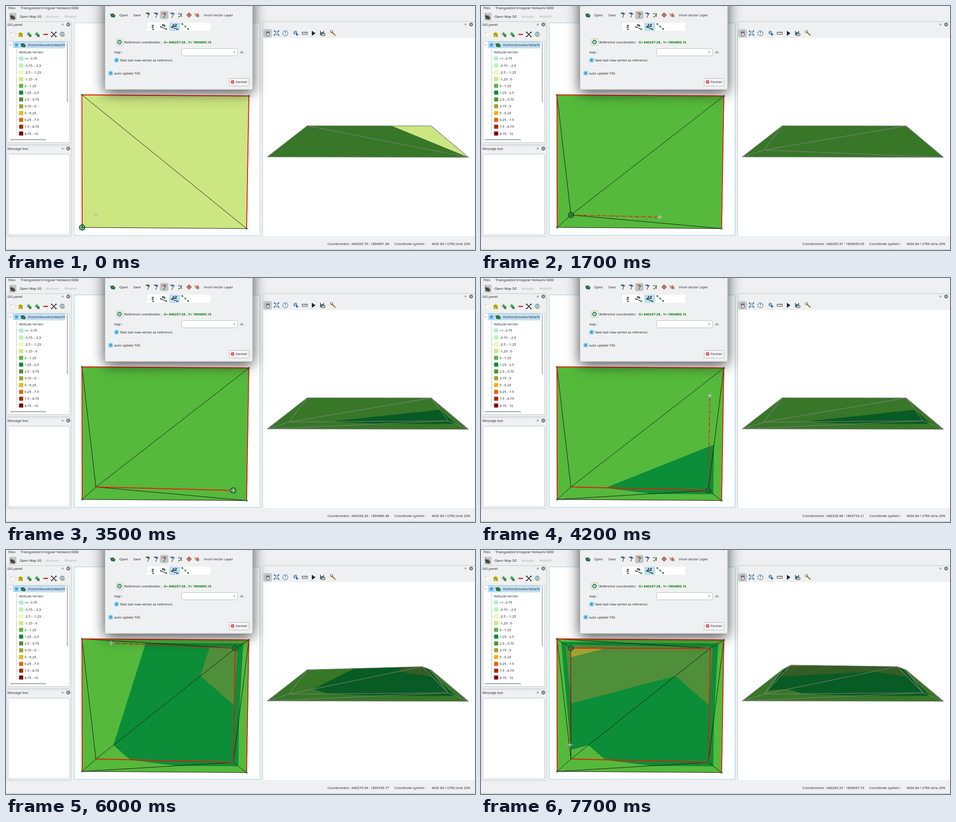
Write an HTML page with a canvas that moves like this. It is 1035 px wide and 541 px high and loops after 8 s.

```html
<!DOCTYPE html>
<html lang="en">
<head>
<meta charset="utf-8">
<title>TIN editor</title>
<style>
html, body { margin: 0; width: 100%; height: 100%; overflow: hidden; background: #eff0f1; }
canvas { display: block; width: 1035px; height: 541px; }
</style>
</head>
<body>
<canvas id="stage" width="1035" height="541"></canvas>
<script>
const g = document.getElementById('stage').getContext('2d');
const LOOP = 8000;
const INK = '#232629', BG = '#eff0f1', BLUE = '#3daee9', RED = '#f5140c', STEEL = '#3f78a8';

// ---------- drawing helpers ----------
function rect(x, y, w, h, fill, stroke, r = 0) {
  g.beginPath();
  g.roundRect(x, y, w, h, r);
  if (fill) { g.fillStyle = fill; g.fill(); }
  if (stroke) { g.strokeStyle = stroke; g.lineWidth = 1; g.stroke(); }
}
function trace(points) {
  g.beginPath();
  points.forEach(([x, y]) => g.lineTo(x, y));
}
function poly(points, fill) {
  trace(points);
  g.fillStyle = fill;
  g.fill();
}
function line(points, color = INK, width = 1, dash = []) {
  trace(points);
  g.setLineDash(dash);
  g.strokeStyle = color;
  g.lineWidth = width;
  g.stroke();
  g.setLineDash([]);
}
const seg = (x0, y0, x1, y1, ...style) => line([[x0, y0], [x1, y1]], ...style);
function disc(x, y, r, fill, stroke, width = 1, dash = []) {
  g.beginPath();
  g.arc(x, y, r, 0, 2 * Math.PI);
  if (fill) { g.fillStyle = fill; g.fill(); }
  if (!stroke) return;
  g.setLineDash(dash);
  g.strokeStyle = stroke;
  g.lineWidth = width;
  g.stroke();
  g.setLineDash([]);
}
function text(s, x, y, color = INK, weight = '', size = 7.5) {
  g.font = `${weight} ${size}px "Noto Sans", sans-serif`;
  g.fillStyle = color;
  g.fillText(s, x, y);
}
function cross(x, y, r, color, width) {
  seg(x - r, y - r, x + r, y + r, color, width);
  seg(x - r, y + r, x + r, y - r, color, width);
}
function plus(x, y, r, color, width) {
  seg(x - r, y, x + r, y, color, width);
  seg(x, y - r, x, y + r, color, width);
}
function diamond(x, y, r, color) {
  poly([[x, y - r], [x + r, y], [x, y + r], [x - r, y]], color);
}
function checkbox(x, y) {
  rect(x - 4, y - 4, 8, 8, '#d9effa', BLUE, 1);
  rect(x - 2.7, y - 2.7, 5.4, 5.4, '#329fdb');
}
const node = (x, y, r = 1.8) => disc(x, y, r, '#2bb14c', '#0a4a1c', 0.8);
function target(x, y, r = 5.7) {
  disc(x, y, r, null, '#1f9143', 2.2);
  disc(x, y, r, null, '#0a4a22', 2.2, [3.1, 1.4]);
  disc(x, y, r * 0.45, null, '#0b6a30', 1.1);
}
function surface(x, y, color = '#1f7a4c') {
  poly([[x - 6, y - 3], [x + 1, y - 4], [x + 6, y + 1], [x + 3, y + 5], [x - 4, y + 4]], color);
  line([[x - 6, y - 3], [x + 3, y + 5], [x + 1, y - 4]], '#173f2b', 0.7);
  disc(x + 1, y, 1.5, '#d9482f');
}
function shade(hex, k) {
  const part = i => Math.round(parseInt(hex.slice(i, i + 2), 16) * k);
  return `rgb(${part(1)},${part(3)},${part(5)})`;
}

// ---------- surface model: each new vertex is one unit higher ----------
const STEP = 1.25;
const legend = ['#aeeddb', '#b5f5ae', '#e9fbae', '#cce682', '#55b93c', '#0c8d38',
  '#508f3a', '#a2a22e', '#f6b012', '#d96c00', '#ad2a00', '#7f0000'];
const lowest = i => (i - 4) * STEP;
const vertices = {
  A: [167.5, 197, 0], B: [536, 199.5, 0], C: [531, 493.5, 0], D: [168, 491, 0],
  1: [198.5, 463.3, 1], 2: [501.5, 471, 2], 3: [506, 218, 3], 4: [198, 217.5, 4]
};
const FRONT = 'BC2 CD2 D12 DA1 ';
const meshes = ['ABC ACD', 'AB1 BC1 CD1 DA1', FRONT + 'AB1 B21',
  FRONT + 'AB3 B23 A31 321', FRONT + 'AB3 B23 A34 A41 431 321'].map(s => s.trim().split(' '));
const corners = names => [...names].map(n => vertices[n]);

const flat = ([x, y]) => [x, y];
function perspective([x, y, z]) {
  const depth = 0.82 + (491 - y) * 0.0018;
  return [801.9 + (x - 352.6) / depth, 158.8 + (144.1 - 4.45 * z) / depth];
}
function area([a, b, c]) {
  return (b[0] - a[0]) * (c[1] - a[1]) - (b[1] - a[1]) * (c[0] - a[0]);
}
// part of a polygon at or above a height
function above(points, height) {
  return points.flatMap((p, i) => {
    const q = points[(i + 1) % points.length];
    const kept = p[2] >= height ? [p] : [];
    if ((p[2] >= height) !== (q[2] >= height)) {
      const f = (height - p[2]) / (q[2] - p[2]);
      kept.push(p.map((v, k) => v + (q[k] - v) * f));
    }
    return kept;
  });
}
function drawMesh(mesh, project, light, edgeColor, edgeWidth) {
  const visible = mesh.filter(t => area(corners(t)) * area(corners(t).map(project)) > 0);
  for (const t of visible)
    for (let i = 4; i < 8; i++) {
      const part = above(corners(t), lowest(i));
      if (part.length) poly(part.map(project), shade(legend[i], light));
    }
  if (mesh === meshes[0]) {
    const pale = project === flat ? corners('ABCD') : [[419, 198.7, 0], ...corners('BC')];
    poly(pale.map(project), legend[3]);
  }
  const edges = new Set(visible.flatMap(([a, b, c]) => [a + b, b + c, c + a].map(e => [...e].sort().join(''))));
  edges.forEach(e => line(corners(e).map(project), edgeColor, edgeWidth));
}

// ---------- pointer: eased moves as [start, end, x, y, arc] ----------
const moves = [
  [1300, 2200, 482, 470.3, 0], [2200, 2400, 495, 470.7, 0], [2800, 3300, 501.5, 470.9, 0],
  [3700, 3900, 503.2, 313.5, 0], [4000, 4300, 505.2, 254, 0], [4500, 5100, 506.3, 218.2, 0],
  [5500, 6250, 198, 217.5, 13], [6800, 7700, 196.3, 432, 0]
];
function pointer(t) {
  let x = 198.5, y = 463.3;
  for (const [start, end, tx, ty, arc] of moves) {
    const f = Math.min(1, Math.max(0, (t - start) / (end - start)));
    const eased = f * (2 - f);
    x += (tx - x) * eased;
    y += (ty - y) * eased - arc * Math.sin(Math.PI * f);
  }
  return [x, y];
}
const level = (t, times) => times.filter(s => t >= s).length;

// ---------- panels ----------
function dockButtons(x, y) {
  diamond(x, y, 2.5, '#7c8083');
  diamond(x, y, 1.3, BG);
  disc(x + 12.5, y, 4.3, '#707476');
  cross(x + 12.5, y, 1.8, '#fff', 1);
}
function dock(title, y, h) {
  rect(0.5, y + 0.5, 144, h, null, '#c3c6c8', 2);
  text(title, 3, y + 10);
  dockButtons(125, y + 7);
}
function drawLeft() {
  text('Files', 5, 7);
  text('Triangulated Irregular Network DEM', 32, 7);
  rect(7, 15, 16, 17, '#c4c7c9', null, 2);
  surface(15, 25, '#39513f');
  seg(10, 19, 14, 25, '#222', 1.2);
  text('Open Map 3D', 30, 26);
  text('Annuler', 89, 26, '#a7abad');
  text('Rétablir', 129, 26, '#a7abad');

  dock('GIS panel', 34, 272);
  rect(11, 60, 6, 8, '#fff', '#e2e2e2');
  disc(11, 60, 1.8, '#f2dd5c');
  rect(28, 59, 9, 10, '#d9c021');
  line([[28, 67], [32, 60], [36, 68]], '#745f0a', 1.2);
  for (const x of [50, 68]) {
    plus(x, 62, 4.3, '#2a9c38', 2.2);
    rect(x + 1, 63.5, 5, 5, '#4b6b50');
  }
  seg(82.5, 63, 92.5, 63, '#c8232b', 2.6);
  cross(105.5, 63, 5, '#111', 1.5);
  for (const sx of [-1, 1]) for (const sy of [-1, 1])
    poly([[105.5 + sx * 6, 63 + sy * 6], [105.5 + sx * 3, 63 + sy * 6], [105.5 + sx * 6, 63 + sy * 3]], '#111');
  disc(124, 62.5, 5, '#8fb6cf', '#6f8c9e');
  seg(119, 62.5, 129, 62.5, '#d8e8f0');
  disc(127, 66, 2.2, '#e3a93c');

  rect(4.5, 78.5, 136, 224, '#fff', '#bfc2c4', 2);
  rect(15, 79, 116, 15, '#c2e0f5');
  line([[7.5, 85], [10, 87.5], [12.5, 85]], '#555', 1);
  checkbox(23, 86.5);
  surface(38, 86.5);
  g.save();
  g.beginPath();
  g.rect(15, 78, 115.5, 18);
  g.clip();
  text('/home/durvane/data/De', 48, 89);
  g.restore();
  text('Altitude terrain', 29, 104.5);
  seg(23.5, 95, 23.5, 283, '#c4c6c8');
  seg(23.5, 101.5, 27, 101.5, '#c4c6c8');
  legend.forEach((color, i) => {
    const y = 116.6 + i * 15.1, top = lowest(i + 1);
    seg(23.5, y, 27, y, '#c4c6c8');
    rect(29, y - 4.5, 9, 9, color);
    text(i ? `${lowest(i)} - ${top}` : `<= ${top}`, 41, y + 2.8);
  });
  seg(135.3, 80, 135.3, 213, '#989b9d', 1.6);
  seg(9, 296.5, 88, 296.5, '#989b9d', 1.8);

  dock('Message box', 309, 202);
  rect(4.5, 328.5, 136, 179, '#fff', '#bfc2c4', 2);
}

function drawPlan(t, built, placed, cursor) {
  rect(150.5, 37.5, 410, 471, '#fff', t < 1000 ? '#a9d8e4' : '#8fd0e8');
  drawMesh(meshes[built], flat, 1, '#111', 1);
  line(corners('DABC'), RED, 1.9);
  line(corners('1234'.slice(0, placed)), RED, 1.9);
  corners('ABCD1234'.slice(0, 4 + built)).forEach(([x, y]) => node(x, y));
  const [x, y] = vertices[placed || 'D'];
  if (placed) line([[x, y], cursor], RED, 1.8, [7.2, 2.6, 1.8, 2.6]);
  target(x, y);
  plus(...cursor, 5.5, '#a5ada0', 2);
  plus(...cursor, 5, '#d2d4cf', 0.9);
}

function drawView(placed) {
  rect(566.5, 34.5, 480, 477, null, '#c3c6c8', 2);
  rect(567, 71, 468, 440.5, '#fff');
  dockButtons(1014, 41);
  rect(569, 52, 17, 17, '#c9ccce', '#b4b7b9', 2);
  rect(574.5, 59, 6.5, 7, '#fff', '#333', 2);
  for (let i = 0; i < 4; i++) seg(574.5 + i * 2.1, 61, 574.5 + i * 2.1, 56, '#444');
  rect(594, 57, 6, 6, '#cfe2ef', STEEL);
  for (const x of [591, 600]) for (const y of [54, 63]) rect(x, y, 3, 3, STEEL);
  disc(616.5, 60.5, 5.6, null, STEEL, 1.1);
  seg(616.5, 56, 616.5, 61, STEEL, 1.3);
  disc(638.5, 59, 4.3, '#6aa0c8');
  text('i', 637.6, 62, '#fff', 'bold', 7);
  poly([[640, 60], [646, 64], [643, 64], [642, 67]], '#222');
  rect(653.5, 58, 11.5, 5, '#f4f4f4', '#444');
  for (let x = 656; x < 665; x += 2.5) seg(x, 58, x, 60.5, '#444', 0.8);
  poly([[675, 55], [683, 60.5], [675, 66]], '#1f2224');
  rect(693, 55, 9, 10, '#3c6d94', null, 1);
  rect(695, 55, 5, 3, '#fff');
  rect(697, 61, 7, 5, '#e6d08a', '#555');
  seg(719, 57.5, 727, 65.5, '#8f6b2a', 2.2);
  disc(718.5, 57, 2.6, null, '#777', 1.4);
  drawMesh(meshes[placed], perspective, 0.645, '#7b7d79', 1.2);
}

function slopeIcon(x, y, label, shift) {
  seg(x - 6, y, x + 6, y + 5, '#111', 1.2);
  node(x - 6, y, 1.4);
  node(x + 6, y + 5, 1.4);
  text(label, x + shift, y - 0.5, '#111', 'bold', 8.5);
}
function editIcon(x, color) {
  poly([[x - 6, 16], [x, 14], [x + 6, 17], [x + 1, 19]], color);
  seg(x + 3, 17, x - 1, 26, '#3a3a3a', 1.2);
  disc(x + 3, 17.5, 1.3, '#d8452e');
}
function drawDialog() {
  g.save();
  g.shadowColor = 'rgba(0,0,0,.72)';
  g.shadowBlur = 30;
  g.shadowOffsetY = 7;
  rect(218, -60, 326.5, 245.5, BG, null, 3);
  g.restore();
  rect(218.5, -60, 325.5, 245, null, '#b5b8ba', 3);
  for (const x of [225, 532]) seg(x, 0, x + 6, 0, '#85898b');

  surface(236, 20.5);
  text('Open', 250, 22.7);
  text('Save', 281, 22.7);
  rect(341, 12, 16.5, 16, '#c3c6c8', '#aaadaf', 2);
  ['#237b4d', '#2a6fa0', '#a8744c', '#3c7fa6'].forEach((color, i) => editIcon(313 + 18 * i, color));
  text('Z', 384, 23, '#111', 'bold', 8);
  for (const y of [17, 24]) node(382, y, 1.1);
  diamond(404, 20, 6, '#c8403c');
  diamond(404, 20, 4, '#f0dedd');
  plus(404, 20, 4, '#32201f', 1);
  surface(422, 20, '#e8a095');
  text('From Vector Layer', 437, 22.7);

  rect(312, 37, 139, 18, '#fff');
  rect(360, 37, 24, 18, '#bbdef5');
  text('Z', 321, 47.5, '#111', 'bold', 9.5);
  node(324.5, 51.5, 1.5);
  slopeIcon(348, 46.5, '%', -4);
  slopeIcon(372, 46.5, 'ΔZ', -5);
  seg(389, 40, 402, 51, '#555', 1, [2, 1.5]);
  for (let i = 0; i < 3; i++) node(389 + 6.5 * i, 40 + 5.5 * i, 1.4);

  rect(243.5, 72.5, 15, 15, '#f5f6f6', '#b4b7b9', 2);
  disc(250.5, 80, 4, null, '#12722f', 1.8);
  disc(250.5, 80, 1.3, '#12722f');
  text('Reference coordinates :', 261, 82.6);
  text('X= 640257.26 , Y= 1804685.15', 348, 82.6, '#087a0c', 'bold');
  text('Gap :', 239, 105.2);
  rect(387.5, 94.5, 123, 16, '#fff', '#b8bbbd', 2);
  text('1', 501.5, 105.2);
  text('m', 517, 105.2);
  checkbox(244, 120);
  text('Take last new vertex as reference', 251, 122.6);
  checkbox(231, 149);
  text('auto update TIN', 238.5, 151.8);
  rect(492.5, 160.5, 43.5, 17, '#f4f5f5', '#b2b5b7', 2);
  disc(500, 168.5, 3.8, '#da3b45');
  cross(500, 168.5, 1.5, '#fff', 0.9);
  text('Fermer', 507, 171.3);
}

function drawStatus([x, y]) {
  const scale = 0.2128;
  const east = 640263.76 + (x - 198.5) * scale, north = 1804691.08 + (463.3 - y) * scale;
  text(`Coordonnées : ${east.toFixed(2)} : ${north.toFixed(2)}`, 709.5, 530);
  text('Coordinate system :', 857, 530);
  text('WGS 84 / UTM zone 20N', 939.5, 530);
  seg(0, 540, 1035, 540, '#b9bcbe');
}

function draw(t) {
  const cursor = pointer(Math.floor(t / 100) * 100);
  const placed = level(t, [1000, 3500, 5400, 6700]);
  const built = level(t, [1100, 3600, 5400, 6700]);
  rect(0, 0, 1035, 541, BG);
  drawLeft();
  drawPlan(t, built, placed, cursor);
  drawView(placed);
  drawDialog();
  drawStatus(cursor);
}

const start = performance.now();
function frame() {
  draw((performance.now() - start) % LOOP);
  requestAnimationFrame(frame);
}
frame();
</script>
</body>
</html>
```
